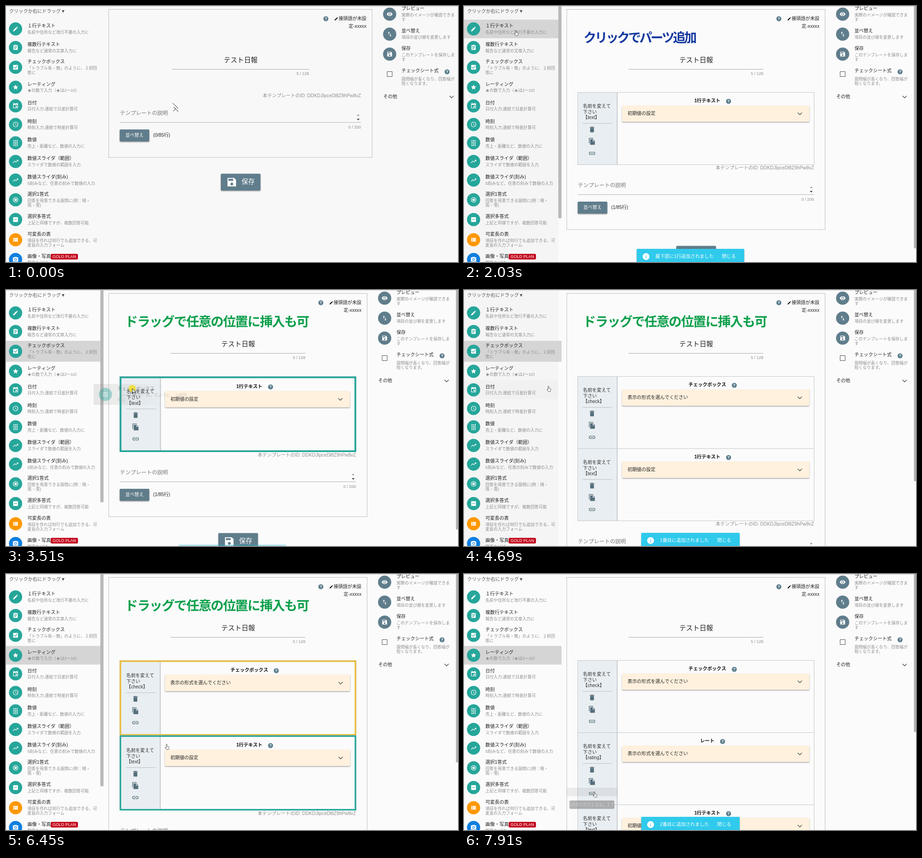
An HTML page with a canvas for the animation above (7.99 s loop, 992x564 px).

```html
<!DOCTYPE html>
<html lang="ja">
<head>
<meta charset="utf-8">
<title>テンプレート編集</title>
<style>
html, body { margin: 0; width: 100%; height: 100%; overflow: hidden; background: #fafafa; }
canvas { display: block; width: 100%; height: 100%; }
</style>
</head>
<body>
<canvas id="stage" width="992" height="564"></canvas>
<script>
const LOOP = 7990;
const c = document.getElementById('stage').getContext('2d');
const FONT = '"Liberation Sans", "Noto Sans CJK JP", "Noto Sans CJK", sans-serif';
const CJK = '"Noto Sans CJK JP", "Noto Sans CJK", sans-serif';
const TEAL = '#26a69a', SLATE = '#607d8b', INK = '#222', GREY = '#8c8c8c', AMBER = '#ebbe3c';

// Glyphs on a 24 unit grid, filled even-odd
const ring = 'M12 2a10 10 0 1 0 .1 0z';
const lens = 'M12 7a5 5 0 1 0 .1 0zM12 9a3 3 0 1 0 .1 0z';
const dots = [2, 8, 14, 20].map(y => [4, 10, 16].map(x => `M${x} ${y}h4v3.5h-4z`).join('')).join('');
const glyphs = {
  pen: 'M3 17.3V21h3.7L17.8 9.9l-3.7-3.7zM20.7 7L17 3.3l-1.9 1.8 3.7 3.8z',
  clip: 'M4 3h5l3-2 3 2h5v18H4zM7 7v2h10V7zM7 11v2h10v-2zM7 15v2h7v-2z',
  check: 'M3 3h18v18H3zM10 17l9-9-1.4-1.4L10 14.2l-3.6-3.6L5 12z',
  star: 'M12 17.3L18.2 21l-1.7-7L22 9.2l-7.2-.6L12 2 9.2 8.6 2 9.2l5.5 4.8L5.8 21z',
  cal: 'M3 3h3V1h2v2h8V1h2v2h3v18H3zM5 8v11h14V8zM12 12h5v5h-5z',
  clock: ring + 'M12 4a8 8 0 1 1-.1 0zM11 7h1.5v5l4 2.6-.8 1.2L11 13z',
  grid: dots,
  trend: 'M16 6l2.3 2.3-4.9 4.9-4-4L2 16.6 3.4 18l6-6 4 4 6.3-6.3L22 12V6z',
  radio: ring + 'M12 4a8 8 0 1 1-.1 0zM12 7a5 5 0 1 0 .1 0z',
  minus: 'M3 3h18v18H3zM7 11v2h10v-2z',
  list: 'M3 5h4v4H3zM3 10h4v4H3zM3 15h4v4H3zM8 5h13v4H8zM8 10h13v4H8zM8 15h13v4H8z',
  cam: 'M2 4h5l2-2h6l2 2h5v16H2z' + lens,
  eye: 'M1 12C5 2.5 19 2.5 23 12 19 21.5 5 21.5 1 12z' + lens,
  sort: 'M9 3L5 7h3v7h2V7h3zM16 17v-7h-2v7h-3l4 4 4-4z',
  save: 'M3 3h14l4 4v14H3zM5 5v4h10V5zM12 13a3 3 0 1 0 .1 0z',
  trash: 'M6 7h12v14H6zM5 4h4l1-1h4l1 1h4v2H5z',
  copy: 'M16 1H2v17h2V3h12zM6 5h9l6 6v12H6zM14 6.5V12h5.5z',
  link: 'M4 12a3 3 0 0 1 3-3h4V7H7a5 5 0 0 0 0 10h4v-2H7a3 3 0 0 1-3-3zM8 13h8v-2H8zM13 7v2h4a3 3 0 0 1 0 6h-4v2h4a5 5 0 0 0 0-10z',
  info: ring + 'M11 7v2h2V7zM11 11v6h2v-6z'
};
for (const k in glyphs) glyphs[k] = new Path2D(glyphs[k]);
const hand = new Path2D('M3 0q1.5-1 2 .5V5l4 .8q1 .3 .8 1.5L9 13H3.5L0 8.5l.8-.8L3 9z');

// icon, centre y, title, description lines, colour
const items = [
  ['pen', 50.5, '１行テキスト', ['名前や住所など改行不要の入力に']],
  ['clip', 91.5, '複数行テキスト', ['報告など通常の文章入力に']],
  ['check', 135, 'チェックボックス', ['「トラブル有・無」のように、２択回', '答に']],
  ['star', 179, 'レーティング', ['★の数で入力（★は2～10）']],
  ['cal', 220, '日付', ['日付入力:連結で日差計算可']],
  ['clock', 261, '時刻', ['時刻入力:連続で時差計算可']],
  ['grid', 301.5, '数値', ['売上・距離など、数値の入力に']],
  ['trend', 342.5, '数値スライダ（範囲）', ['スライダで数値の範囲を入力']],
  ['trend', 383.5, '数値スライダ(刻み)', ['5刻みなど、任意の刻みで数値の入力']],
  ['radio', 427, '選択1答式', ['回答を用意できる設問に(例：晴・', '雨・雪)']],
  ['minus', 470.5, '選択多答式', ['上記と同様ですが、複数回答可能']],
  ['list', 515, '可変長の表', ['項目を作れば何行でも追加できる、可', '変長の入力フォーム'], '#ff9800'],
  ['cam', 558.5, '画像・写真', ['写真などは'], '#0f7fe0']
];
const kinds = {
  text: ['1行テキスト', '初期値の設定'],
  check: ['チェックボックス', '表示の形式を選んでください'],
  rating: ['レート', '表示の形式を選んでください']
};
const toasts = [
  [1730, '最下部に1行追加されました'],
  [4026, '1番目に追加されました'],
  [6620, '2番目に追加されました']
];
const drags = [
  { from: 3120, drop: 3930, end: 4006, item: 2, b: 3.5 },
  { from: 5380, drop: 6400, end: 6600, item: 3, b: 3.4 }
];
const path = [
  [80, 366, 214], [640, 240, 120], [930, 240, 120], [1300, 110, 54], [2180, 110, 54],
  [2500, 80, 122], [3120, 80, 122], [3510, 277, 217], [3900, 312, 240], [4220, 312, 240],
  [4690, 182, 212], [5050, 74, 177], [5380, 74, 177], [5700, 304, 282], [6250, 349, 375],
  [7000, 349, 375], [7350, 322, 386], [7610, 322, 386], [7910, 283, 480]
];

const clamp = v => Math.max(0, Math.min(1, v));
const ramp = (t, a, b) => clamp((t - a) / (b - a));

function text(s, x, y, size, color = INK, align = 'left', weight = 400) {
  c.font = `${weight} ${size}px ${FONT}`;
  c.fillStyle = color;
  c.textAlign = align;
  c.fillText(s, x, y + 0.5);
}
function rect(x, y, w, h, color) { c.fillStyle = color; c.fillRect(x, y, w, h); }
function round(x, y, w, h, r, color) {
  c.fillStyle = color;
  c.beginPath(); c.roundRect(x, y, w, h, r); c.fill();
}
function raised(...a) {
  c.save();
  c.shadowColor = 'rgba(0,0,0,.35)'; c.shadowBlur = 2.5; c.shadowOffsetY = 1.5;
  round(...a);
  c.restore();
}
function frame(x, y, w, h, color, lw = 1) {
  c.strokeStyle = color; c.lineWidth = lw;
  c.strokeRect(x + lw / 2, y + lw / 2, w - lw, h - lw);
}
function disc(x, y, r, color) { c.fillStyle = color; c.beginPath(); c.arc(x, y, r, 0, 7); c.fill(); }
function icon(name, x, y, size, color) {
  c.save();
  c.translate(x - size / 2, y - size / 2);
  c.scale(size / 24, size / 24);
  c.fillStyle = color;
  c.fill(glyphs[name], 'evenodd');
  c.restore();
}
function badge(name, x, y, color) { disc(x, y, 14.5, color); icon(name, x, y, 14, '#fff'); }
function help(x, y) { disc(x, y, 5.5, '#5b7c8c'); text('?', x, y, 8.5, '#fff', 'center', 700); }
function line(color, lw, ...p) {
  c.strokeStyle = color; c.lineWidth = lw;
  c.beginPath();
  for (let i = 0; i < p.length; i += 2) c.lineTo(p[i], p[i + 1]);
  c.stroke();
}
function chevron(x, y) { line('#555', 1.5, x - 4.5, y - 2, x, y + 2.5, x + 4.5, y - 2); }
function triangle(x, y, d, color) {
  c.fillStyle = color;
  c.beginPath(); c.moveTo(x - 3, y); c.lineTo(x + 3, y); c.lineTo(x, y + d); c.fill();
}

function pointer(t) {
  const i = path.findIndex(k => k[0] > t);
  if (i === 0) return path[0].slice(1);
  if (i < 0) return path[path.length - 1].slice(1);
  const [t0, x0, y0] = path[i - 1], [t1, x1, y1] = path[i];
  const p = (t - t0) / (t1 - t0);
  return [x0 + (x1 - x0) * p, y0 + (y1 - y0) * p];
}

function itemHalf(it) { return it[3].length > 1 ? 23 : 20.5; }
function drawItem([name, y, title, desc, color = TEAL]) {
  const two = desc.length > 1;
  badge(name, 21, y, color);
  text(title, 47, y - (two ? 12 : 6.5), 10.25);
  desc.forEach((s, i) => text(s, 47, y + (two ? 1.8 : 7.2) + i * 10.4, 9, GREY));
}

function sidebar(t, mx, my) {
  const active = t < 1220 ? -1 : t < 2360 ? 0 : t < 5000 ? 2 : 3;
  text('クリックか右にドラッグ▼', 7, 12, 10.3, '#555');
  items.forEach((it, i) => {
    const h = itemHalf(it), over = mx < 207 && Math.abs(my - it[1]) < h;
    if (i === active) rect(0, it[1] - h, 214, h * 2, '#d5d5d5');
    else if (over) rect(0, it[1] - h, 207, h * 2, 'rgba(0,0,0,.015)');
    drawItem(it);
  });
  round(98, 546, 60, 12.5, 3, '#c40a1e');
  text('GOLD PLAN', 128, 552, 9, '#fff', 'center');
  if ((t > 1150 && t < 4006) || (t > 5080 && t < 6600)) rect(207, 0, 7, 467.5, '#b9b9b9');
}

function tools(dx) {
  const x = 868 + dx;
  const entry = (name, y, title, ty, ...desc) => {
    badge(name, 842 + dx, y, SLATE);
    text(title, x, ty, 10.1);
    desc.forEach((s, i) => text(s, x, ty + 14 + i * 10.2, 9, GREY));
  };
  entry('eye', 18, 'プレビュー', 6, '実際のイメージが確認できま', 'す');
  entry('sort', 62, '並べ替え', 55, '項目の並び順を変更します');
  entry('save', 106, '保存', 94, 'このテンプレートを保存しま', 'す');
  frame(836 + dx, 144, 12, 12, '#555', 1);
  text('チェックシート式', x, 143, 10.2);
  help(968 + dx, 145);
  text('設問幅が長くなり、回答幅が', x, 161, 9, GREY);
  text('短くなります。', x, 171, 9, GREY);
  text('その他', 828 + dx, 200, 10.2);
  chevron(978 + dx, 200);
}

function block(kind, y, b, edge) {
  const [title, hint] = kinds[kind], h = 159 + 2 * b, x = 250 + b;
  const top = y + b + .5;
  rect(250, y, 87 + b, h, '#e9eef2');
  line('#b5b9bc', 1.3, 336.3 + b * .7, y, 336.3 + b * .7, y + h);
  frame(249, y, 520, h + 1, '#c4c6c8');
  if (edge) frame(249.5, y + .5, 519, h + .5, edge, b + .3);
  ['名前を変えて', '下さい', `【${kind}】`].forEach((s, i) =>
    text(s, x + 11, top + 30 + i * 12.8, 10.2, '#333'));
  line('#b9bec2', 1, x + 10.5, top + 68, x + 76, top + 68);
  ['trash', 'copy', 'link'].forEach((n, i) => icon(n, x + 31, top + 81.5 + i * 26.3, 16.5, '#546e7a'));
  c.font = `700 10.3px ${FONT}`;
  const w = c.measureText(title).width, left = 546 - (w + 24) / 2;
  text(title, left, top + 18.5, 10.3, '#111', 'left', 700);
  help(left + w + 18, top + 19.5);
  raised(347 + b * .6, top + 28.5, 411 - b * 1.5, 36, 2, '#fff1de');
  text(hint, 359 + b * .6, top + 46.5, 10.2);
  chevron(737 - b * .9, top + 46.5);
}

function form(t, rows, dx, drag, mx, my) {
  const right = 804 + dx, mid = 515 + dx / 2;
  const b = drag ? (t > 6300 ? 3 : drag.b) : 0, pitch = 159 + 2 * b, s = rows.length * pitch;
  frame(225, 7, right - 225, Math.round(327 + s), '#bdbdbd');
  help(702 + dx, 28);
  icon('pen', 725 + dx, 28, 10, '#111');
  text('接頭語が未設', 791 + dx, 28, 10.2, INK, 'right');
  text('定-xxxxx', 791 + dx, 45, 10.2, INK, 'right');
  text('テスト日報', mid, 119, 14.8, INK, 'center');
  const end = rows.length ? 657 : 665, start = rows.length ? 361 : 364;
  line('#a8a8a8', 1, start, 139.5, end, 139.5);
  text('5 / 128', end, 149.5, 9, GREY, 'right');

  rows.forEach((k, i) => {
    const y = 190 + i * pitch, over = mx > 250 && my >= y && my < y + pitch;
    block(k, y, b, drag && (over ? TEAL : AMBER));
  });

  const edge = 779 + dx;
  text('本テンプレートのID: DDKDJIpceDl8Z9hPw8vZ', edge, 197.5 + s, 10.25, '#8c8c8c', 'right');
  text('テンプレートの説明', 250, 236.5 + s, 11.7, '#777');
  triangle(edge - 6, 242 + s, -3.5, '#999');
  triangle(edge - 6, 248.5 + s, 3.5, '#333');
  line('#b0b0b0', 1, 250, 256.5 + s, edge, 256.5 + s);
  text('0 / 200', edge, 267 + s, 9, GREY, 'right');
  raised(249.5, 272 + s, 65, 26.5, 2, SLATE);
  text('並べ替え', 282, 285 + s, 10, '#fff', 'center');
  text(`(${rows.length}/85行)`, 323, 284.5 + s, 10.3);
  raised(mid - 43.5, 369.5 + s, 87, 37, 2, SLATE);
  icon('save', mid - 19.5, 388 + s, 25, '#fff');
  text('保存', mid + 2, 387.5 + s, 14.4, '#fff');

  if (rows.length) rect(987.5, 0, 4.5, 564 * 564 / (437 + s), '#b0b0b0');
}

function caption(s, x, size, color, spacing, alpha) {
  if (alpha <= 0) return;
  c.save();
  c.globalAlpha = alpha;
  c.font = `700 ${size}px ${CJK}`;
  c.letterSpacing = spacing + 'px';
  c.textAlign = 'left';
  c.fillStyle = color;
  c.fillText(s, x, 69);
  c.restore();
}

function toast(t, [at, msg]) {
  const out = ramp(t, at + 1580, at + 1955);
  if (t < at || out === 1) return;
  const enter = ramp(t, at, at + 260), y = 535 + 40 * (1 - enter) ** 2 + 48 * out;
  c.save();
  c.globalAlpha = enter * clamp(1 - 1.3 * out);
  c.font = `400 10.2px ${FONT}`;
  const w = c.measureText(msg).width, x = Math.round(497 - (w + 108) / 2);
  raised(x, y, Math.round(w + 108), 36, 2, '#2fcaec');
  icon('info', x + 20.5, y + 17, 18, '#fff');
  text(msg, x + 41, y + 17, 10.2, '#fff');
  text('閉じる', x + w + 59, y + 17, 10.2, '#fff');
  c.restore();
}

function ghost(drag, mx, my) {
  const [, x0, y0] = path.find(k => k[0] === drag.from), it = items[drag.item];
  c.save();
  c.translate(mx - x0, my - y0);
  const g = c.createLinearGradient(0, 0, 150, 0);
  g.addColorStop(0, 'rgba(120,120,120,.16)');
  g.addColorStop(1, 'rgba(120,120,120,0)');
  rect(-5, it[1] - itemHalf(it), 155, itemHalf(it) * 2, g);
  c.globalAlpha = .38;
  drawItem(it);
  c.restore();
}

function cursor(t, x, y, dragging) {
  c.save();
  if (dragging) disc(x, y, 8, 'rgba(245,225,30,.8)');
  c.translate(x, y);
  if (t < 1000) {
    line('#222', 1, 0, 0, 12, 12);
    line('#222', 1, 1, 18, 6, 12, 12, 19);
    line('#222', 1, 2, 9, 6, 12);
  } else if (dragging) {
    c.fillStyle = '#fff'; c.strokeStyle = '#222'; c.lineWidth = 1;
    c.beginPath();
    [[0, 0], [0, 11], [3, 8.5], [8, 8]].forEach(p => c.lineTo(...p));
    c.closePath(); c.fill(); c.stroke();
    c.setLineDash([1.5, 1.5]);
    c.strokeRect(1, 8, 7, 5);
  } else {
    c.scale(.9, .9);
    c.fillStyle = '#fff'; c.fill(hand);
    c.strokeStyle = '#444'; c.lineWidth = .9; c.stroke(hand);
  }
  c.restore();
}

function tooltip(s, x, y, w, alpha) {
  if (alpha <= 0) return;
  c.save();
  c.globalAlpha = alpha;
  round(x, y, w, 18.5, 3, '#777');
  text(s, x + w / 2, y + 9, 8.5, '#eee', 'center');
  c.restore();
}

function draw(t) {
  const [mx, my] = pointer(t);
  const rows = t < 1710 ? [] : t < 4006 ? ['text'] : t < 6600 ? ['check', 'text'] : ['check', 'rating', 'text'];
  const dx = rows.length ? -11 : 0;
  const drag = drags.find(d => t >= d.from && t < d.end);
  const holding = drag && t < drag.drop;

  c.textBaseline = 'middle';
  rect(0, 0, 992, 564, rows.length ? '#fbfbfb' : '#f8f8f8');
  if (rows.length && mx < 207) rect(0, 0, 207, 564, '#f5f5f5');
  rect(0, 0, 992, 1.5, '#dedede');
  form(t, rows, dx, drag, mx, my);
  sidebar(t, mx, my);
  tools(dx);
  toasts.forEach(o => toast(t, o));
  caption('クリックでパーツ追加', 262.5, 28, '#1438a0', -3.5, ramp(t, 320, 560) * (1 - ramp(t, 2450, 2650)));
  caption('ドラッグで任意の位置に挿入も可', 261, 28.5, '#0b9f4b', -1.6, ramp(t, 3120, 3320) * (1 - ramp(t, 6900, 7100)));
  tooltip('項目の複製を追加できます', 226, 471, 110, .12 * ramp(t, 7610, 7700));
  tooltip('1行目の形式を追加します', 231.5, 499, 98.5, .55 * ramp(t, 7700, 7900));
  if (holding) ghost(drag, mx, my);
  cursor(t, mx, my, holding);
}

const begin = performance.now();
function tick() {
  draw((performance.now() - begin) % LOOP);
  requestAnimationFrame(tick);
}
tick();
</script>
</body>
</html>
```
